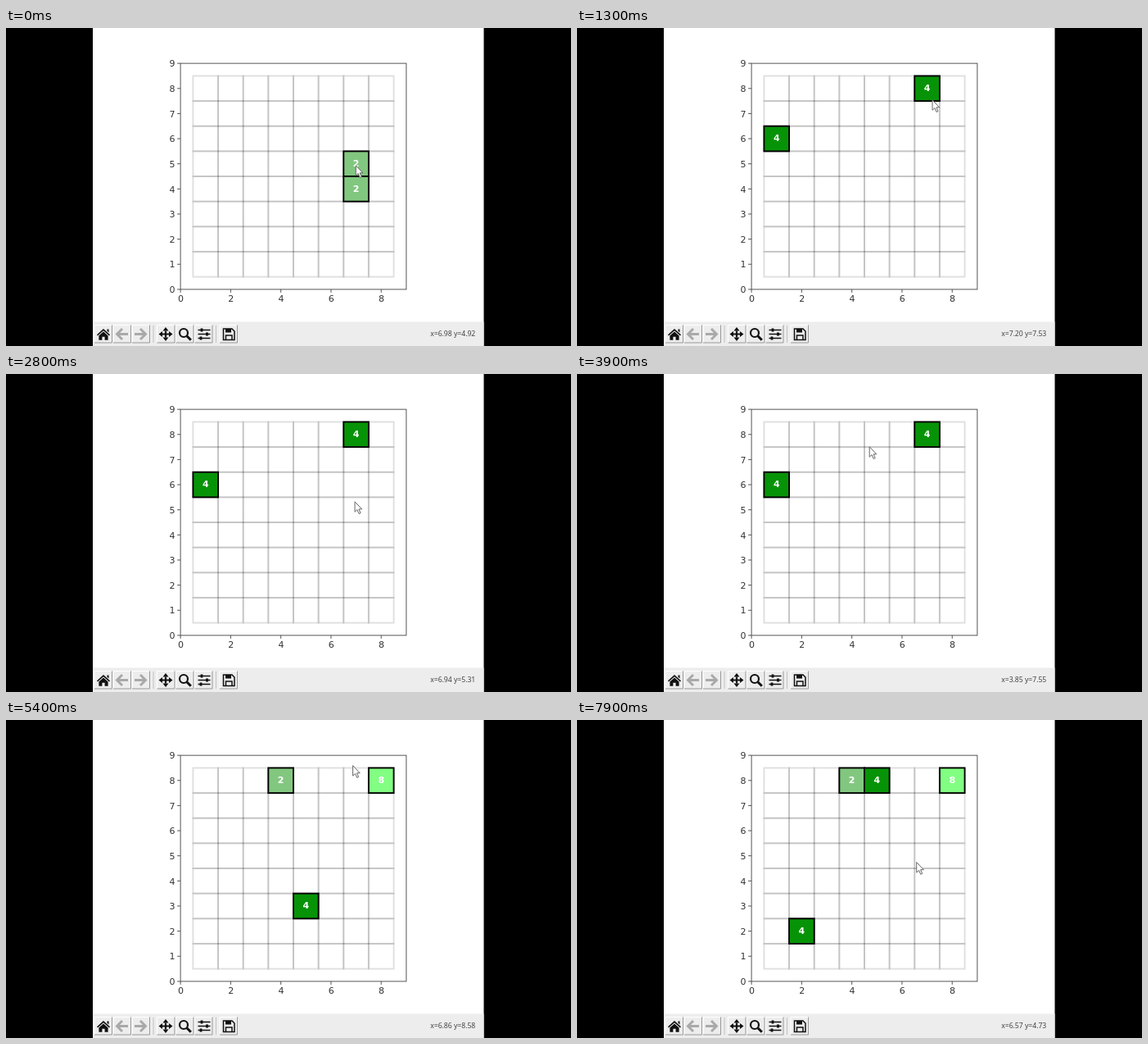
Write an HTML page that moves like this. It is 690x388 px and loops after 8 s.

```html
<!DOCTYPE html>
<html lang="en">
<head>
<meta charset="utf-8">
<title>Number tiles on a plot</title>
<style>
  html, body { margin: 0; width: 100%; height: 100%; overflow: hidden; background: #000; }
  svg { display: block; width: 100%; height: 100%; }
  .label { font: 11px "DejaVu Sans", sans-serif; fill: #333; }
  .value { font: bold 11px "DejaVu Sans", sans-serif; fill: #fff; text-anchor: middle; }
  .readout { font: 8.6px "Noto Sans", sans-serif; fill: #444; text-anchor: end; }
  .cell { fill: none; stroke: #000; stroke-opacity: .12; stroke-width: 2; }
  .tile { stroke: #000; stroke-width: 1.9; }
  .axis { fill: none; stroke: #555; stroke-width: 1; }
  .edge { fill: none; stroke: #999; }
  .shine { fill: none; stroke: #fff; }
</style>
</head>
<body>
<svg viewBox="0 0 690 388">
  <rect x="106" width="477.5" height="388" fill="#fff"/>
  <g id="plot"></g>
  <g id="tiles"></g>
  <rect x="106" y="358.5" width="477.5" height="29.5" fill="#ededed"/>
  <g id="buttons"></g>
  <g fill="none" stroke="#a9a9a9" stroke-width="2.9">
    <path d="M149 373.5H136M142 367l-6.5 6.5 6.5 6.5"/>
    <path d="M157 373.5h13M164 367l6.5 6.5-6.5 6.5"/>
  </g>
  <g fill="#111">
    <path d="M119 367l8 7.2-1 1.2-7-6.2-7 6.2-1-1.2zM123.5 367.5h2v4l-2-1.8zM119 370.500l5.600 5v5.200h-4v-4h-3.200v4h-4v-5.200z"/>
    <path d="M191 373.500h8M195 369.500v8" stroke="#111" stroke-width="2.200"/>
    <path d="M195 365l3.500 4.500h-7zM195 382l3.500-4.500h-7zM186.500 373.500l4.500-3.500v7zM203.500 373.500l-4.500-3.500v7z"/>
    <path d="M268 367h7v4.500h-7z"/>
  </g>
  <g fill="none" stroke="#111">
    <circle cx="217" cy="372" r="5" stroke-width="2.2"/>
    <path d="M220.800 375.800l5 5" stroke-width="3"/>
    <path d="M234.500 368.500h15M234.500 373.500h15M234.500 378.500h15" stroke-width="1.500"/>
    <path d="M239 366.500v4M245.500 371.500v4M238 376.500v4" stroke-width="2.800"/>
    <path d="M265.500 367h10.500l3 3v10.500h-13.500zM268.500 380v-5h7.500v5" stroke-width="1.500"/>
  </g>
  <text id="readout" class="readout" x="573.3" y="375.7"></text>
  <path id="pointer" d="M0 0v12.500l2.900-2.700 2.100 4.900 2-.9-2.100-4.700h3.700z"
        fill="#fff" stroke="#666" stroke-linejoin="round"/>
</svg>
<script>
const LOOP = 8000, STEP = 100, SIZE = 8, UNIT = 30.64;
const COLORS = { 2: "#82c77f", 4: "#079307", 8: "#82ff82" };
const X = 0, Y = 1;

const px = x => 213.1 + UNIT * x;
const py = y => 318.9 - UNIT * y;
const $ = id => document.getElementById(id);

// Each glide: start, end, destination in plot units
const GLIDES = [
  [200, 500, 6.95, 4.5], [700, 1300, 7.2, 7.53],
  [1900, 2300, 6.85, -1.75], [2300, 2800, 6.94, 5.31],
  [2800, 3500, 3.85, 7.55], [3800, 4100, 7.1, 7.35],
  [4400, 4700, 6.91, 7.19], [4700, 4900, 6.92, 6],
  [5000, 5200, 6.86, 8.58], [5500, 5900, 6.62, 4.8],
  [6000, 6300, 6.42, 6.43], [6500, 6800, 6.4, 8.61],
  [7000, 7700, 6.57, 4.73]
];

// Tiles slide once the plot redraws after a drag, then a new one appears
const DRAGS = [
  { press: 700, redraw: 1300, axis: Y, spawn: [1, 6, 4] },
  { press: 3800, redraw: 4200, axis: X, spawn: [4, 5, 2] },
  { press: 5100, redraw: 5400, axis: Y, spawn: [5, 3, 4] },
  { press: 6500, redraw: 7000, axis: Y, spawn: [2, 2, 4] }
];

function add(parent, name, attrs, text = "") {
  const el = document.createElementNS("http://www.w3.org/2000/svg", name);
  for (const key in attrs) el.setAttribute(key, attrs[key]);
  el.textContent = text;
  parent.append(el);
}

function addSquare(parent, x, y, attrs) {
  add(parent, "rect", { x: px(x - .5), y: py(y + .5), width: UNIT, height: UNIT, ...attrs });
}

function drawPlot() {
  const plot = $("plot"), end = SIZE + 1;
  for (let x = 1; x <= SIZE; x++)
    for (let y = 1; y <= SIZE; y++) addSquare(plot, x, y, { class: "cell" });
  add(plot, "rect", { class: "axis", x: px(0), y: py(end), width: end * UNIT, height: end * UNIT });
  for (let i = 0; i <= end; i++) {
    add(plot, "path", { class: "axis", d: `M${px(0)} ${py(i)}h-4` });
    add(plot, "text", { class: "label", x: 206.5, y: py(i) + 4.2, "text-anchor": "end" }, i);
    if (i % 2) continue;
    add(plot, "path", { class: "axis", d: `M${px(i)} ${py(0)}v4` });
    add(plot, "text", { class: "label", x: px(i) + .4, y: 334.2, "text-anchor": "middle" }, i);
  }
}

function drawButtons() {
  const box = $("buttons");
  for (let i = 0; i < 7; i++) {
    const group = Math.floor(i / 3), x = 108 + 23 * i + 7.5 * group;
    add(box, "path", { class: "shine", d: `M${x} 384v-21.5h21.5` });
    add(box, "path", { class: "edge", d: `M${x} 384h21.5v-21.5` });
    if (group && i % 3 === 0) add(box, "path", { class: "edge", d: `M${x - 4.5} 363v21`, opacity: .5 });
  }
}

// Pushes tiles to the far end of an axis; equal neighbours merge
function slide(tiles, axis) {
  const result = [];
  for (const tile of [...tiles].sort((a, b) => b[axis] - a[axis])) {
    const line = result.filter(other => other[1 - axis] === tile[1 - axis]);
    const last = line.at(-1);
    if (last && last[2] === tile[2]) {
      last[2] *= 2;
    } else {
      const moved = [...tile];
      moved[axis] = SIZE - line.length;
      result.push(moved);
    }
  }
  return result;
}

const boards = [[[7, 5, 2], [7, 4, 2]]];
for (const { axis, spawn } of DRAGS) boards.push([...slide(boards.at(-1), axis), spawn]);

let shownBoard;
function showBoard(board) {
  if (board === shownBoard) return;
  shownBoard = board;
  const tiles = $("tiles");
  tiles.replaceChildren();
  for (const [x, y, value] of board) {
    addSquare(tiles, x, y, { class: "tile", fill: COLORS[value] });
    add(tiles, "text", { class: "value", x: px(x), y: py(y) + 3.4 }, value);
  }
}

const smooth = k => k * k * (3 - 2 * k);

function pointerAt(t) {
  let x = 6.98, y = 4.92;
  for (const [start, end, toX, toY] of GLIDES) {
    if (t <= start) break;
    const k = smooth(Math.min(1, (t - start) / (end - start)));
    x += (toX - x) * k;
    y += (toY - y) * k;
  }
  return [x, y];
}

function render(t) {
  showBoard(boards[DRAGS.filter(d => d.redraw <= t).length]);
  const [x, y] = pointerAt(t);
  $("pointer").setAttribute("transform", `translate(${px(x) + .3} ${py(y) - .4})`);
  // The readout freezes until the plot redraws
  const drag = DRAGS.find(d => d.press <= t && t < d.redraw);
  const [readX, readY] = pointerAt(drag ? drag.press : t);
  $("readout").textContent = readY < 0 ? "" : `x=${readX.toFixed(2)} y=${readY.toFixed(2)}`;
}

drawPlot();
drawButtons();
const begin = performance.now();
function tick() {
  const t = (performance.now() - begin) % LOOP;
  render(Math.floor(t / STEP) * STEP);
  requestAnimationFrame(tick);
}
tick();
</script>
</body>
</html>
```
